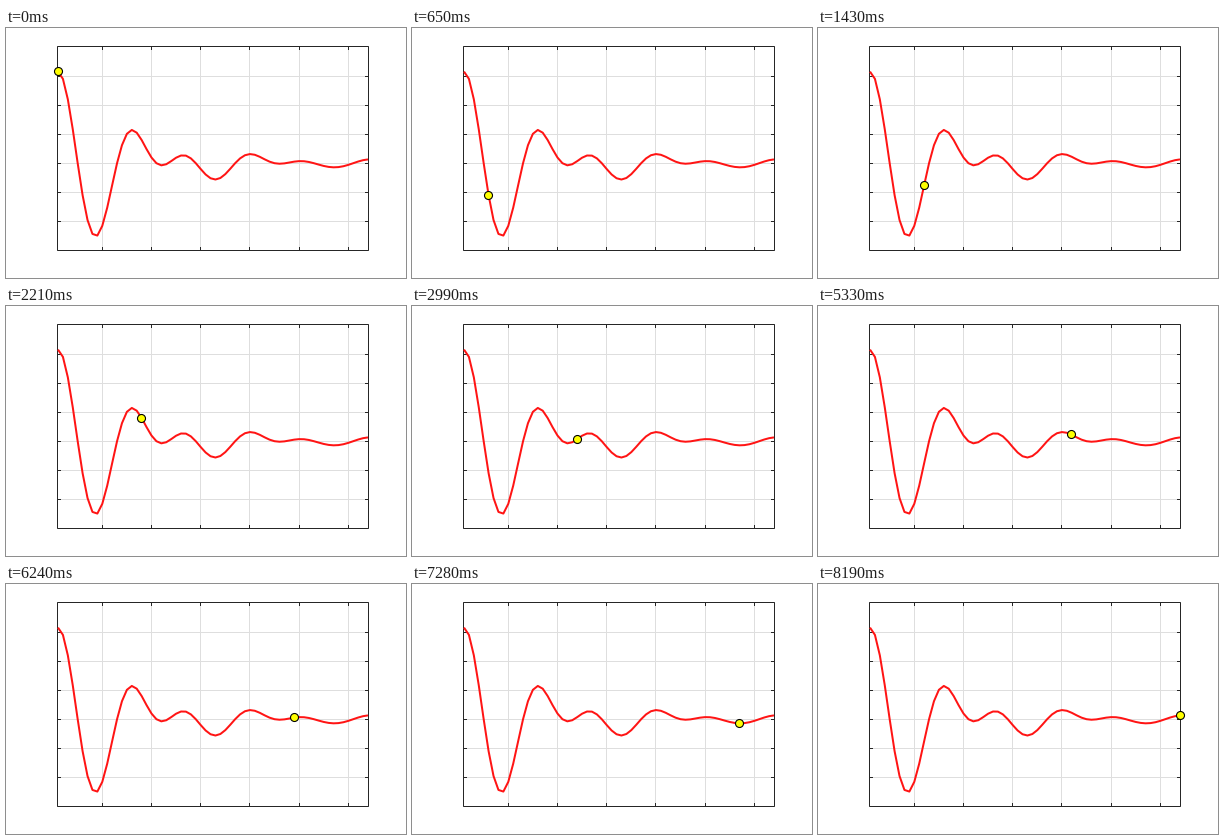
A matplotlib script for the animation above (8320 ms loop, 400 by 250 pixels).

```python
import numpy as np
import matplotlib.pyplot as plt
from matplotlib.animation import FuncAnimation

W, H, DPI = 400, 250, 100
PX = 72 / DPI  # points per pixel
LEFT, RIGHT, TOP, BOTTOM = 51.5, 362.5, 18.5, 222.5
TICK = 3.5
INK, GRID = "#262626", "#dedede"

N = 64
STEP = 310 / (N - 1)
ZERO_Y = 135.2
PEAK = 91.6

# Smooth even envelope, given at every crest of the carrier
SPACING = 8
CRESTS = np.array([1, 0.79, 0.333, -0.06, -0.178, -0.092, 0.017, 0.045, 0.042])


def envelope(t):
    """Band-limited interpolation through the crests, mirrored about zero."""
    k = np.arange(1 - len(CRESTS), len(CRESTS))
    return np.sinc(t[:, None] / SPACING - k) @ CRESTS[abs(k)]


lag = np.arange(N)
xs = 52 + STEP * lag
ys = ZERO_Y - PEAK * np.cos(np.pi * lag / SPACING) * envelope(lag)

fig = plt.figure(figsize=(W / DPI, H / DPI), dpi=DPI, facecolor="white")
ax = fig.add_axes([0, 0, 1, 1])
ax.set(xlim=(0, W), ylim=(H, 0))
ax.axis("off")


def hairline(x, y, color=INK, z=2):
    ax.plot(x, y, color=color, lw=PX, zorder=z, snap=False,
            solid_capstyle="butt", solid_joinstyle="miter")


for tick in range(10, N, 10):
    x = np.floor(52 + STEP * (tick - 1)) + 0.5
    hairline([x, x], [TOP, BOTTOM], GRID, 1)
    hairline([x, x], [TOP, TOP + TICK])
    hairline([x, x], [BOTTOM, BOTTOM - TICK])

for k in range(1, 7):
    y = round(18.75 + 203.75 * k / 7) + 0.5
    hairline([LEFT, RIGHT], [y, y], GRID, 1)
    hairline([LEFT, LEFT + TICK], [y, y])
    hairline([RIGHT, RIGHT - TICK], [y, y])

ax.add_patch(plt.Rectangle((LEFT, TOP), RIGHT - LEFT, BOTTOM - TOP, fill=False,
                           ec=INK, lw=PX, snap=False, zorder=2))

ax.plot(xs, ys, color="#ff1414", lw=2 * PX, zorder=3,
        solid_joinstyle="round", solid_capstyle="butt")
marker = ax.add_patch(plt.Circle((0, 0), 4, fc="#ffff00", ec="black",
                                 lw=1.1 * PX, zorder=4))


def update(i):
    # The marker sits on whole pixels
    marker.center = np.floor(xs[i] + 1e-6) + 0.5, np.floor(ys[i]) + 0.5
    return marker,


anim = FuncAnimation(fig, update, frames=N, interval=130, repeat=True,
                     repeat_delay=0)
plt.show()
```
